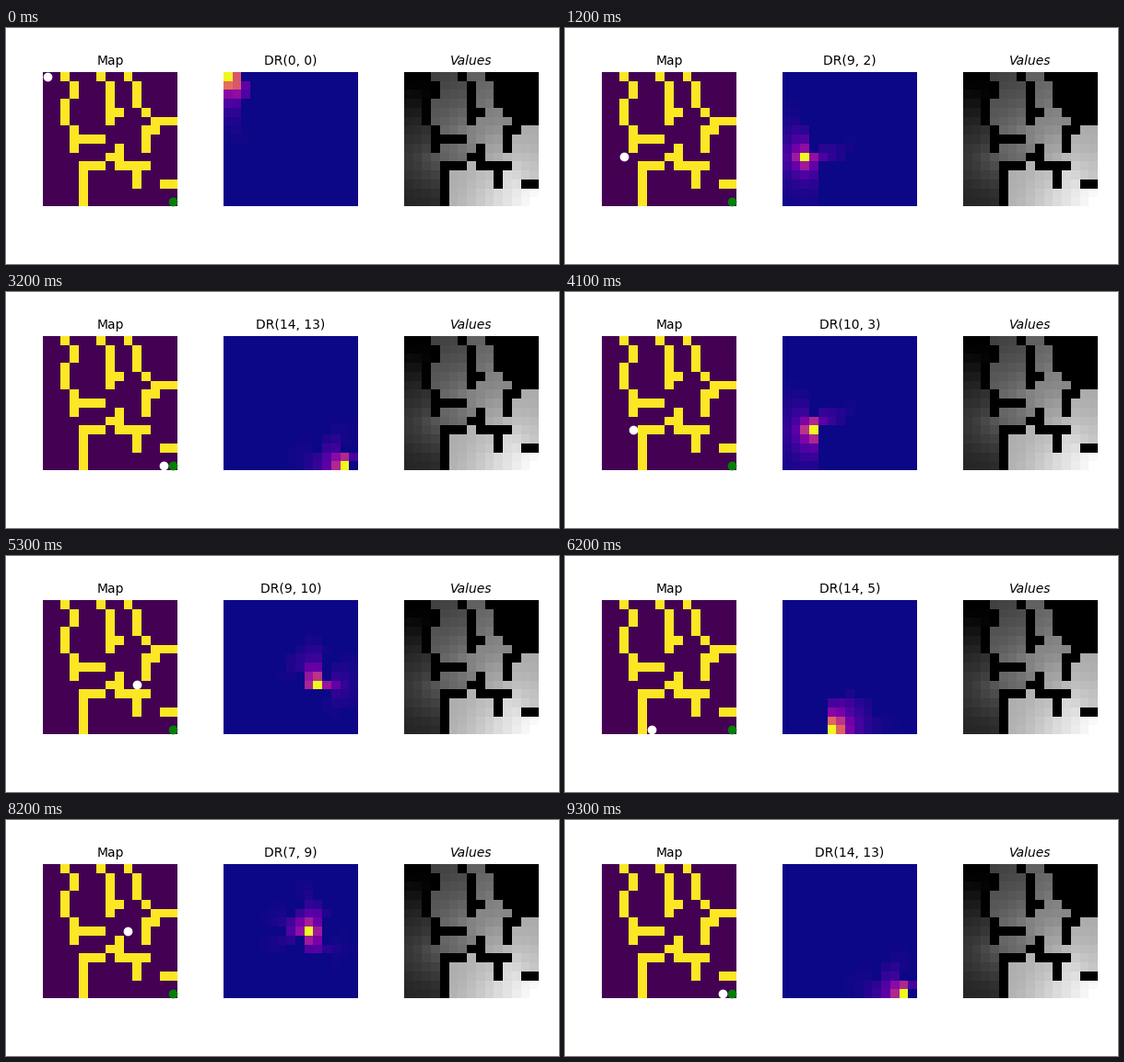
A matplotlib script that plays this animation: 600x257 px, repeating every 9400 ms.

```python
import numpy as np
import matplotlib.pyplot as plt
from matplotlib.animation import FuncAnimation

W, H, DPI = 600, 257, 100
STEP_COST = 0.15
GOAL, EXIT = (14, 14), (14, 13)
STARTS = [(0, 0), (14, 0), (14, 5), (0, 7)]

MAZE = """
..#...#..#.....
...#...#..#....
...#...#..#....
..#....#..#....
..#....##..#...
..#....#....###
...#.......##..
...####....#...
...#....#..#...
.......##......
....###.####...
....#.....#....
....#.....#..##
....#..........
....#..........
""".split()

walls = np.array([[ch == "#" for ch in row] for row in MAZE])
N = len(walls)


def neighbours(cell):
    r, c = cell
    around = [(r + 1, c), (r, c + 1), (r - 1, c), (r, c - 1)]
    return [(y, x) for y, x in around
            if 0 <= y < N and 0 <= x < N and not walls[y, x]]


def index(cell):
    return cell[0] * N + cell[1]


def distances(target):
    dist = {target: 0}
    queue = [target]
    for cell in queue:
        for nxt in neighbours(cell):
            if nxt not in dist:
                dist[nxt] = dist[cell] + 1
                queue.append(nxt)
    return dist


def solve():
    """Default representation of a uniform random walk, and goal desirability."""
    walk = np.zeros((N * N, N * N))
    for cell in np.ndindex(N, N):
        near = neighbours(cell)
        if walls[cell] or cell == GOAL:
            continue
        for nxt in near:
            walk[index(cell), index(nxt)] = 1 / len(near)
    to_goal = walk[:, index(GOAL)].copy()
    walk[:, index(GOAL)] = 0
    rep = np.linalg.inv(np.exp(STEP_COST) * np.eye(N * N) - walk)
    return rep, rep @ to_goal


rep, desire = solve()
dist = distances(EXIT)


def walk_from(start):
    """Shortest route to the exit; the start is held for one extra step."""
    route = [start, start]
    while route[-1] != EXIT:
        here = route[-1]
        closer = [n for n in neighbours(here) if dist[n] < dist[here]]
        route.append(max(closer, key=lambda n: rep[index(n), index(EXIT)]))
    return route


def value_map():
    values = np.full((N, N), np.nan)
    for cell in dist:
        values[cell] = 0 if cell == GOAL else np.log(desire[index(cell)])
    return np.where(np.isnan(values), np.nanmin(values), values)


def dr_map(cell):
    field = rep[index(cell)].reshape(N, N)
    return field / field.max()


def panel(left, title, data, cmap, **title_style):
    ax = fig.add_axes([left / W, 1 - 194 / H, 146 / W, 146 / H])
    image = ax.imshow(data, cmap=cmap, interpolation="nearest")
    ax.axis("off")
    return ax, image, ax.set_title(title, fontsize=10, **title_style)


path = [cell for start in STARTS for cell in walk_from(start)]

plt.rcParams["font.family"] = "DejaVu Sans"
fig = plt.figure(figsize=(W / DPI, H / DPI), dpi=DPI, facecolor="white")

map_ax, _, _ = panel(40, "Map", walls, "viridis")
map_ax.plot(GOAL[1], GOAL[0], "o", color="green", ms=6, clip_on=False)
agent, = map_ax.plot([0], [0], "o", color="white", ms=6, clip_on=False)
_, heat, heat_title = panel(236, "DR(0, 0)", dr_map((0, 0)), "plasma")
heat.set_clim(0, 1)
panel(432, "Values", value_map(), "gray", style="italic")


def update(i):
    row, col = path[i]
    agent.set_data([col], [row])
    heat.set_data(dr_map((row, col)))
    heat_title.set_text(f"DR({row}, {col})")
    return agent, heat, heat_title


anim = FuncAnimation(fig, update, frames=len(path), interval=100,
                     repeat=True, repeat_delay=0)
plt.show()
```
